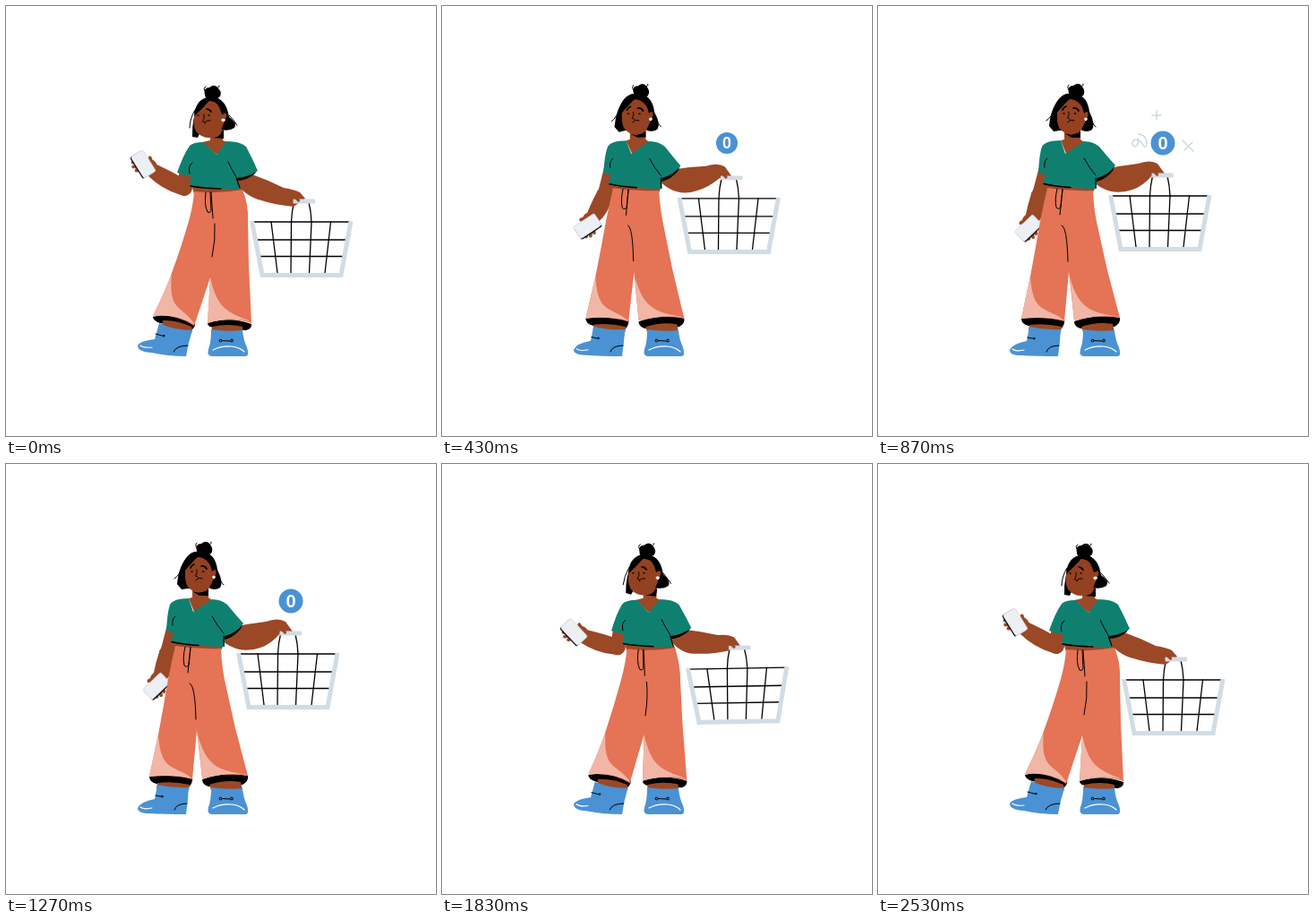
An HTML page for the animation above (3000 ms loop, 480 px wide and 480 px high).

```html
<!DOCTYPE html>
<html lang="en">
<head>
<meta charset="utf-8">
<title>Empty basket</title>
<style>
html, body { margin: 0; width: 100%; height: 100%; overflow: hidden; background: #fff; }
svg { display: block; width: 100vw; height: 100vh; }
text { font: bold 20px "Liberation Sans", Arial, sans-serif; }
</style>
</head>
<body>
<svg id="stage" viewBox="0 0 480 480"></svg>
<script>
const LOOP = 3000;
const SKIN = '#9b4826', FACE = '#934121', GREEN = '#0f8070', CORAL = '#e57355', BLUSH = '#f1b6a6',
      BLUE = '#4a92d4', GREY = '#d2dce4', INK = '#000', NONE = 'none';
const stage = document.getElementById('stage');

function add(tag, attrs, parent = stage) {
  const el = document.createElementNS('http://www.w3.org/2000/svg', tag);
  for (const k in attrs) el.setAttribute(k, attrs[k]);
  parent.appendChild(el);
  return el;
}
const line = (d, color, width, parent) => add('path', {
  d, fill: NONE, stroke: color, 'stroke-width': width,
  'stroke-linecap': 'round', 'stroke-linejoin': 'round' }, parent);
const lerp = (a, b, t) => a + (b - a) * t;
const clamp = x => Math.max(0, Math.min(1, x));
const span = (t, a, b) => clamp((t - a) / (b - a));
const inOut = x => x < .5 ? 4 * x ** 3 : 1 - 4 * (1 - x) ** 3;
const there = (t, a, b, c, d) => inOut(span(t, a, b)) - inOut(span(t, c, d));

// Blend two paths with the same commands; numbers alternate x, y.
function mix(a, b, tx, ty = tx) {
  const nums = b.match(/-?[\d.]+/g);
  let i = 0;
  return a.replace(/-?[\d.]+/g, n => {
    const w = i % 2 ? ty : tx;
    return lerp(+n, +nums[i++], w).toFixed(2);
  });
}

// Smooth keyframes that never overshoot.
function track(keys, t) {
  const n = keys.length;
  let i = 0;
  while (i < n - 2 && t > keys[i + 1][0]) i++;
  const slope = j => (keys[j + 1][1] - keys[j][1]) / (keys[j + 1][0] - keys[j][0]);
  const tangent = j => {
    if (j < 1 || j > n - 2) return 0;
    const l = slope(j - 1), r = slope(j);
    return l * r <= 0 ? 0 : 2 * l * r / (l + r);
  };
  const [t0, v0] = keys[i], [t1, v1] = keys[i + 1];
  const h = t1 - t0, u = clamp((t - t0) / h), w = 1 - u;
  return v0 * (1 + 2 * u) * w * w + tangent(i) * h * u * w * w
       + v1 * u * u * (3 - 2 * u) - tangent(i + 1) * h * u * u * w;
}

const gripX = [[0, 332.5], [220, 332], [430, 323], [620, 318], [870, 317.5], [1380, 317.5],
               [1570, 320], [1830, 332], [2130, 332.5], [2530, 332.5]];
const gripY = [[0, 218], [220, 205], [430, 192], [620, 189], [1570, 189],
               [1830, 205], [2130, 220], [2530, 218]];
const swing = [[0, 0], [180, -1], [430, 0], [1570, 0], [1830, -1], [2130, 2], [2340, -.5], [2530, 0]];

// Morphing body parts
const parts = [];
function shape(fill, a, b) {
  parts.push({ el: add('path', { fill }), a, b });
}
function stroke(color, width, a, b) {
  parts.push({ el: line(a, color, width), a, b });
}

// Basket
const basket = add('g', {});
['M-58 23H52', 'M-54 43H47', 'M-51 61.5H45', 'M-36.5 23L-29.5 80', 'M-14 23L-14.5 80',
 'M8.5 23L6 80', 'M30 23L23.5 80', 'M-14 23Q-13.5 11 -11 1', 'M8.5 23Q8 11 5.5 1']
  .forEach(d => line(d, INK, 1.3, basket));
add('path', { d: 'M-58 22L-46.5 82.5H41.5L52.5 22', fill: NONE, stroke: GREY, 'stroke-width': 5 }, basket);

// Arm holding the phone
const upperArm = line('', SKIN, 16);
const arm = add('g', {});
const foreArm = add('path', { fill: SKIN }, arm);
add('circle', { r: 9, fill: SKIN }, arm);
const hand = add('g', {}, arm);
add('circle', { cx: -8, cy: 2, r: 7.5, fill: SKIN }, hand);
['M-4 0L11 -4', 'M-4 -2L8 -8', 'M-6 -3L3 -10', 'M-10 4L-3 10'].forEach(d => line(d, SKIN, 3.8, hand));
const phone = add('g', { transform: 'rotate(208)' }, hand);
add('rect', { x: -14, y: -6.5, width: 28, height: 15.5, rx: 2, fill: INK }, phone);
add('rect', { x: -14, y: -8, width: 28, height: 15.5, rx: 2, fill: '#eceff4', stroke: '#d3d9e1', 'stroke-width': .8 }, phone);

// Legs and shoes
shape(INK, 'M164 347Q164 351 172 354L208 361Q212 357 211 354Q190 340 164 347Z',
           'M160 349Q160 355 168 357L205 360Q209 354 208 350Q185 343 160 349Z');
shape(INK, 'M225 354Q225 358 232 359L268 362Q275 360 274 355Q250 346 225 354Z',
           'M219 352Q219 358 226 360L264 358Q271 354 270 348Q245 343 219 352Z');
shape(SKIN, 'M175 351Q190 350 207 358L208 364L174 360Z', 'M169 356Q187 354 205 358L204 364L168 362Z');
shape(SKIN, 'M230 358Q248 354 264 358L264 364L229 364Z', 'M227 358Q245 352 262 355L264 364L229 364Z');
shape(BLUE, 'M171 354Q188 362 208 362Q203 377 201 391Q180 391 163 387Q147 386 147 379Q149 374 166 372Z',
            'M169 358Q186 362 204 361Q203 377 201 391Q178 391 160 390Q147 390 147 384Q150 377 166 374Z');
stroke('#fff', 1.2, 'M150 379Q154 382 163 381', 'M150 383Q154 386 163 384');
stroke(INK, 1, 'M187 386Q190 379 203 379', 'M188 386Q190 379 202 379');
stroke(INK, 1, 'M167 366L174 368', 'M167 370L172 371');
stroke(INK, 1, 'M175 368Q176 366 177.5 368Q176 370.5 175 368', 'M173 371Q174 369 175.5 371Q174 373.5 173 371');
add('path', { fill: BLUE, d: 'M229 361Q247 364 264 362Q265 373 269 381Q272 391 267 391H230Q224 391 226 383Q229 376 229 361Z' });
line('M231 384Q240 379 252 380Q261 381 266 386', '#fff', 1.2);
line('M241 373.5L250 374', INK, 1);
for (const cx of [239.5, 252]) add('circle', { cx, cy: 373.5, r: 1.4, fill: BLUE, stroke: INK });

// Trousers
shape(SKIN, 'M207 199L262 202L265 208Q236 212 210 210Z', 'M186 196L243 202L240 208Q214 209 188 206Z');
shape(CORAL, 'M210 207Q236 210 264 205Q271 222 270 240L271 290L274 354Q250 346 225 354L228 303L210 357Q190 343 164 346Q178 318 185 298Q196 268 204 240Q209 222 210 207Z',
             'M189 203Q214 207 240 206Q241 230 246 250L256 295L270 348Q245 344 219 351L213 297L208 352Q186 346 160 349Q166 320 170 302Q176 270 181 240Q185 220 189 203Z');
shape(BLUSH, 'M185 299C181 343 197 333 211 356Q190 343 164 346Q178 318 185 299Z',
             'M170 302C173 345 188 335 208 351Q186 346 160 349Q166 320 170 302Z');
shape(BLUSH, 'M228 303C236 338 246 341 273 352Q250 346 225 354Z',
             'M214 302C224 340 240 342 269 347Q245 344 219 351Z');
stroke(INK, 1, 'M223 208Q221 222 225 230Q228 232 229 228L228 208', 'M200 204Q197 216 199 225Q202 228 204 224L206 205');
stroke(INK, 1, 'M229 208L231 237', 'M206 205L203 233');
stroke(INK, 1, 'M233 243Q234 262 230 280', 'M205 245Q211 246 212 285');

// Basket arm, neck, shirt
const basketArm = add('path', { fill: SKIN });
const ARM_A = 'M250 183L272 187Q292 194 310 203Q322 205 328 208L334 215L321 224Q300 222 285 217Q267 213 252 192Z';
const ARM_B = 'M232 182L254 182Q272 178 290 176Q304 171 312 176L320 187L306 189Q296 201 284 205Q256 215 234 190Z';
shape(SKIN, 'M228 138L243 138L242 150L247 152L235 166L219 152L228 150Z',
            'M208 136L226 136L226 149L230 152L210 165L204 150L208 149Z');
shape(INK, 'M230 147Q239 147 241 139L243 139L243 148Q236 150 230 147Z',
           'M208 142Q217 146 226 139L226 147Q216 147 208 142Z');
shape(INK, 'M257 191Q270 191 280 184L277 188Q268 195 258 195Z',
           'M243 191Q256 188 264 179L262 184Q255 193 244 196Z');
shape(GREEN, 'M220 152L235 166L246 151Q262 151 268 157Q275 170 281 184Q270 191 257 192L262 204Q235 206 205 200L207 191L191 186Q198 166 205 156Q209 152 220 152Z',
             'M204 150L209 165L230 151Q240 151 247 157Q256 168 265 178Q257 189 244 192L244 204Q215 204 184 198L187 188L179 187Q180 165 183 157Q187 150 204 150Z');
stroke(INK, 1, 'M208 175Q203 178 205 187', 'M189 170Q185 173 186 180');
stroke(INK, 1, 'M248 174Q252 183 257 191', 'M230 170Q236 181 243 189');
stroke(INK, 1.5, 'M206 201Q220 203.5 240 204', 'M185 198.5Q198 201.5 215 202.5');
stroke(INK, 1.1, 'M257 192L261 203', 'M243 192L243 203');

// Head
shape(INK, 'M216 108Q207 126 208 146L214 147L218 138L240 138Q249 140 255 136Q259 131 249 124Q246 104 232 102Q220 102 216 108Z',
           'M204 102Q193 112 191 134L196 140L203 139L226 138Q233 142 239 138Q243 132 236 118Q234 101 221 98Q208 97 204 102Z');
stroke(INK, 1, 'M211 116Q205 126 205 136', 'M198 113Q194 124 188 128');
stroke(INK, 1, 'M249 122Q255 128 258 133', 'M236 120Q239 132 243 135');
shape(FACE, 'M212 114Q207 130 212 140Q219 148 229 147Q239 146 241 136L246 124Q247 118 242 118Q240 108 228 106Q216 106 212 114Z',
            'M201 110Q198 130 203 137Q209 144 217 143Q226 143 229 134L234 124Q236 117 230 117Q226 106 216 104Q204 104 201 110Z');
shape(INK, 'M229 103Q222 112 210 123Q211 106 224 102Q242 98 246 119L241 121Q238 109 229 103Z',
           'M218 100Q210 107 198 121Q196 104 210 98Q230 96 234 117L230 120Q228 107 218 100Z');
shape(INK, 'M222 99Q220 91 227 91Q233 86 237 92Q242 97 238 102Q232 106 226 103Q222 103 222 99Z',
           'M213 97Q211 89 218 89Q224 84 228 90Q232 95 229 100Q223 104 217 101Q213 101 213 97Z');
stroke(INK, 1, 'M223 96Q219 92 223 90', 'M214 95Q210 91 213 88');
stroke(INK, 1, 'M234 92Q238 92 238 89', 'M225 90Q230 90 229 87');
stroke(INK, 1.7, 'M211 118Q213 115 216 115', 'M206 116Q207 113 210 112');
stroke(INK, 1.7, 'M224 115Q227 115 229 118', 'M218 114Q222 113 224 117');
stroke(INK, 1.4, 'M214 122L215 122', 'M207 120L208 120');
stroke(INK, 1.4, 'M226 122L227 122', 'M219.5 120L220.5 120');
stroke(INK, .9, 'M221 121Q222 125 219.5 129L222 130', 'M213 118Q214 122 211.5 125L214 126');
stroke(INK, 1, 'M222 131Q223 127 228 128', 'M212 130Q214 126 219 128');
shape('#fff', 'M240 127Q242.5 124 245 127Q242.5 131.5 240 127Z', 'M230 126Q232 123 234 126Q232 130.5 230 126Z');

// Grip over the fingers
const grip = add('g', {});
add('rect', { x: -12, y: -2.4, width: 24.5, height: 4.8, rx: 1, fill: GREY }, grip);
line('M-9 -4L-6 -1', SKIN, 3.2, grip);

// Counter and sparks
const badge = add('g', {});
add('circle', { r: 13.5, fill: BLUE }, badge);
add('text', { y: 7.2, 'text-anchor': 'middle', fill: '#fff' }, badge).textContent = '0';
const sparks = [
  [-26, -1, 'M-2 -9Q9 -8 8 3Q6 8 4 3Q-1 -5 -7 -2Q-10 3 -5 5Q0 3 -2 -4'],
  [-7, -31, 'M0 -5V5M-5 0H5'],
  [28, 3, 'M-6 -6L6 6M5 -4L-4 5M-3 -3L2 2']
].map(([x, y, d]) => ({ x, y, el: line(d, '#c9d7e0', 1.4) }));

function draw(t) {
  const p = there(t, 0, 600, 1360, 2080);
  const a = there(t, 0, 610, 1300, 2060);
  for (const s of parts) s.el.setAttribute('d', mix(s.a, s.b, p));

  const ex = lerp(199, 180, p), ey = lerp(203, 211, p);
  const reach = lerp(53, 39, a), wrist = reach - 9;
  upperArm.setAttribute('d', `M${lerp(202, 187, p)} ${lerp(182, 184, p)}L${ex} ${ey}`);
  arm.setAttribute('transform', `translate(${ex} ${ey}) rotate(${lerp(-150, -252, a)})`);
  foreArm.setAttribute('d', `M0 -9Q${reach * .4} -14 ${wrist} -8L${wrist} 7Q${reach * .4} 9 0 9Z`);
  hand.setAttribute('transform', `translate(${reach} 0)`);

  const gx = track(gripX, t), gy = track(gripY, t);
  const hold = `translate(${gx} ${gy}) rotate(${track(swing, t)})`;
  basket.setAttribute('transform', hold);
  grip.setAttribute('transform', hold);
  basketArm.setAttribute('d', mix(ARM_A, ARM_B, lerp((332.5 - gx) / 15, p, .5), (218 - gy) / 29));

  const pop = track([[330, 0], [430, .89], [520, 1], [1580, 1], [1720, 0]], t);
  badge.setAttribute('transform', `translate(318 153) scale(${pop})`);

  const out = 1 - (1 - span(t, 560, 850)) ** 3;
  const size = out * (1 - span(t, 930, 1130));
  for (const s of sparks) {
    s.el.setAttribute('transform', `translate(${318 + s.x * out} ${153 + s.y * out}) scale(${size})`);
    s.el.style.display = size > 0 ? '' : NONE;
  }
}

const start = performance.now();
function tick() {
  draw((performance.now() - start) % LOOP);
  requestAnimationFrame(tick);
}
tick();
</script>
</body>
</html>
```
